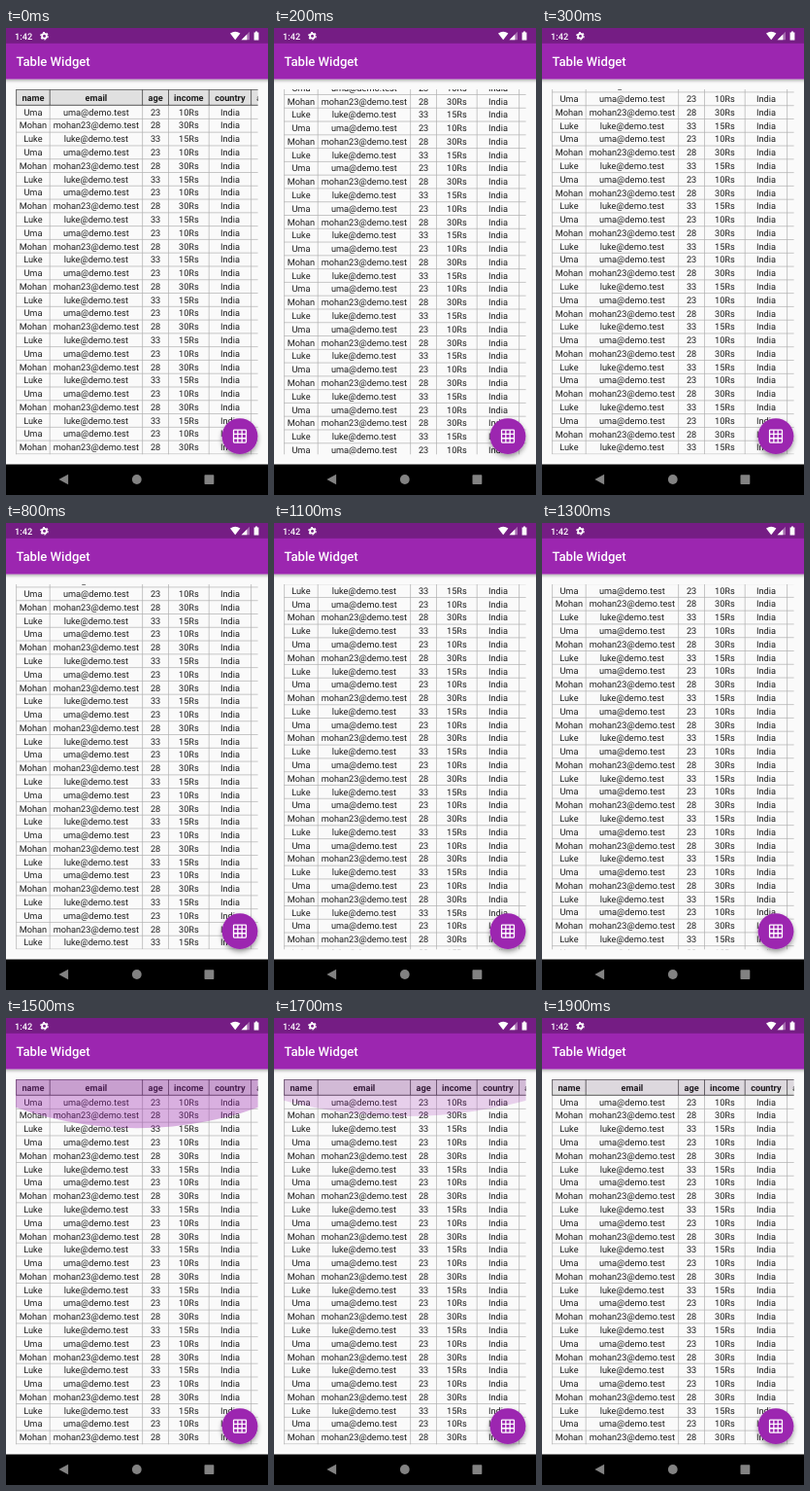
These frames come from a looping animation (270x480 px, 2000 ms). An HTML page:

```html
<!DOCTYPE html>
<html lang="en">
<head>
<meta charset="utf-8">
<title>Table Widget</title>
<style>
  html, body { margin: 0; width: 100%; height: 100%; overflow: hidden; background: #fafafa; }
  svg { display: block; width: 100vw; height: 100vh; font-family: Roboto, "Liberation Sans", sans-serif; text-rendering: geometricPrecision; }
  #table { font-size: 9.2px; text-anchor: middle; fill: #1c1c1c; }
  .head { font-weight: 700; }
</style>
</head>
<body>
<svg viewBox="0 0 270 480" xmlns="http://www.w3.org/2000/svg">
  <defs>
    <clipPath id="view"><rect x="10" y="63" width="249.6" height="375.2"/></clipPath>
    <filter id="barShadow" x="-10%" y="-20%" width="120%" height="160%">
      <feDropShadow dx="0" dy="1.6" stdDeviation="1.5" flood-opacity=".32"/>
    </filter>
    <filter id="fabShadow" x="-40%" y="-40%" width="180%" height="190%">
      <feDropShadow dx="0" dy="2.6" stdDeviation="2.4" flood-opacity=".4"/>
    </filter>
  </defs>

  <rect width="270" height="480" fill="#fafafa"/>
  <g clip-path="url(#view)">
    <g id="table"></g>
    <g id="glow" fill="#9c27b0"><circle cx="135" cy="-324.8" r="375"/></g>
  </g>

  <rect x="-10" y="-10" width="290" height="62.5" fill="#9c27b0" filter="url(#barShadow)"/>
  <rect width="270" height="15.8" fill="#751d84"/>
  <text x="10.5" y="38.8" font-size="13.14" font-weight="500" fill="#fff">Table Widget</text>

  <g fill="#fff">
    <text x="9" y="12.2" font-size="9.2" font-weight="500">1:42</text>
    <circle cx="39.5" cy="8.3" r="2.4" fill="none" stroke="#fff" stroke-width="1.8"/>
    <circle cx="39.5" cy="8.3" r="3.7" fill="none" stroke="#fff" stroke-width="1.2" stroke-dasharray="1.94"/>
    <path d="M231 5.6Q236.2 2 241.4 5.6L236.2 12.2Z"/>
    <path d="M251 3.8V12.2H242.6Z" opacity=".35"/>
    <path d="M248.4 6.4V12.2H242.6Z"/>
    <path d="M255.6 4.4H257V3.5H259V4.4H260.4V12.4H255.6Z"/>
  </g>

  <g>
    <circle cx="241" cy="419.6" r="18.4" fill="#9c27b0" filter="url(#fabShadow)"/>
    <g transform="translate(232.4 411) scale(.717)" fill="none" stroke="#fff" stroke-width="1.8">
      <rect x="3" y="3" width="18" height="18" rx="1"/>
      <path d="M9 3V21M15 3V21M3 9H21M3 15H21"/>
    </g>
  </g>

  <rect y="448.5" width="270" height="31.5" fill="#000"/>
  <g fill="#828282">
    <path d="M54.4 464L64.1 458.7V469.3Z"/>
    <circle cx="134.8" cy="464" r="4.9"/>
    <rect x="204.5" y="459.2" width="9.8" height="9.8" rx=".7"/>
  </g>
</svg>

<script>
const LOOP = 2000, STEP = 100;
const TOP = 63.1, BOTTOM = 438, HEAD = 16.5, ROW = 13.78, ROWS = 30;
const MAX_SCROLL = HEAD + ROWS * ROW - (BOTTOM - TOP);
const edges = [10.6, 45.2, 140.6, 167.5, 209.2, 252.6, 300];
const titles = ["name", "email", "age", "income", "country"];
const people = [
  ["Uma", "uma@demo.test", "23", "10Rs", "India"],
  ["Mohan", "mohan23@demo.test", "28", "30Rs", "India"],
  ["Luke", "luke@demo.test", "33", "15Rs", "India"]
];
const table = document.getElementById("table");
const glow = document.getElementById("glow");

function add(tag, attrs, text) {
  const node = document.createElementNS("http://www.w3.org/2000/svg", tag);
  for (const key in attrs) node.setAttribute(key, attrs[key]);
  if (text) node.textContent = text;
  table.append(node);
}

function addCells(cells, y, cls) {
  cells.forEach((cell, i) =>
    add("text", { x: (edges[i] + edges[i + 1]) / 2, y, class: cls }, cell));
}

function addGrid(y, height, lines, color) {
  let d = edges.map(x => `M${x} ${y}V${y + height}`).join("");
  for (let i = 0; i <= lines; i++) d += `M10.3 ${y + i * height / lines}H300`;
  add("path", { d, fill: "none", stroke: color, "stroke-width": .66 });
}

function buildTable() {
  const body = TOP + HEAD;
  addGrid(body, ROWS * ROW, ROWS, "#acacac");
  add("rect", { x: 10.6, y: TOP + .3, width: 290, height: HEAD - .6, fill: "#e0e0e0" });
  addGrid(TOP + .3, HEAD - .6, 1, "#222");
  addCells(titles, TOP + 11.5, "head");
  add("text", { x: 258.2, y: TOP + 11.5, class: "head", style: "text-anchor:start" }, "address");
  for (let i = 0; i < ROWS; i++) addCells(people[i % 3], body + i * ROW + 10.1);
}

// Linear interpolation through [time, value] points
function track(points, t) {
  const i = points.findIndex(p => p[0] >= t);
  if (i < 0) return points[points.length - 1][1];
  if (i === 0) return points[0][1];
  const [t0, v0] = points[i - 1], [t1, v1] = points[i];
  return v0 + (v1 - v0) * (t - t0) / (t1 - t0);
}

const scroll = [[0, 0], [100, 6], [200, 24.9], [300, MAX_SCROLL], [800, MAX_SCROLL],
  [1000, 51], [1200, 37.8], [1300, 17], [1400, 0]];
const glowAlpha = {
  bottom: [[300, 0], [400, .22], [500, .35], [600, .2], [700, .08], [800, 0]],
  top: [[1300, 0], [1400, .22], [1500, .35], [1700, .2], [1800, .1], [1900, .04]]
};

function draw(now) {
  let t = Math.floor(now % LOOP / STEP) * STEP;
  if (t === 1600) t = 1500; // the full glow is held for two steps
  table.setAttribute("transform", `translate(0 ${-track(scroll, t)})`);

  const atTop = t > 1000;
  const alpha = track(atTop ? glowAlpha.top : glowAlpha.bottom, t);
  const size = Math.sqrt(alpha / .35) * (atTop ? 1 : -1);
  glow.setAttribute("opacity", alpha);
  glow.setAttribute("transform", `translate(0 ${atTop ? TOP : BOTTOM}) scale(1 ${size})`);
}

buildTable();
const start = performance.now();
function tick() {
  draw(performance.now() - start);
  requestAnimationFrame(tick);
}
tick();
</script>
</body>
</html>
```
